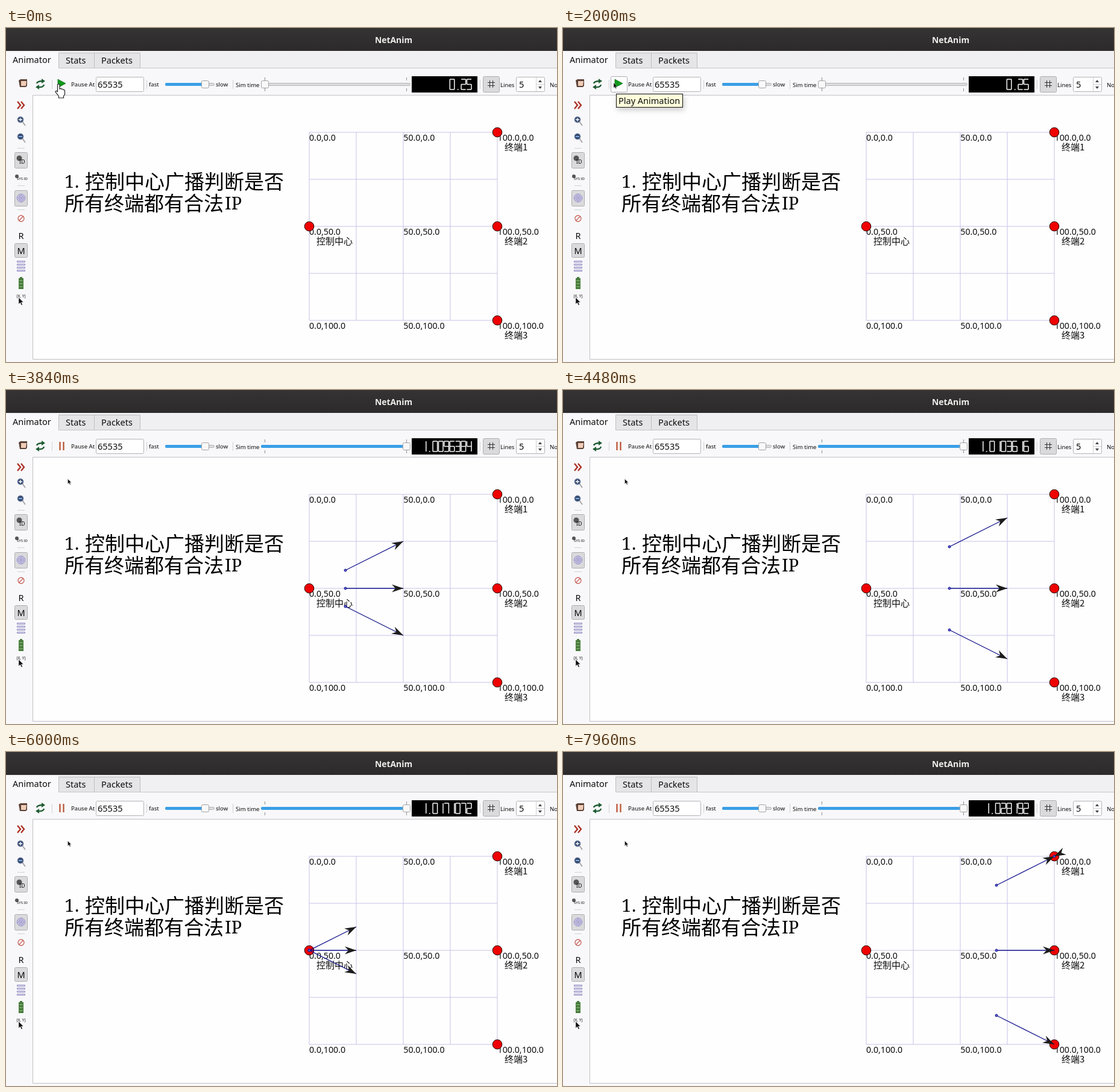
An HTML page that plays this animation: 914 px wide and 554 px high, repeating every 8 s.

```html
<!DOCTYPE html>
<html lang="zh-CN">
<head>
<meta charset="utf-8">
<title>NetAnim</title>
<style>
html, body { margin: 0; width: 100%; height: 100%; overflow: hidden; background: #fefefe; }
svg { display: block; width: 914px; height: 554px; }
text { font: 500 14.5px "Noto Sans", "Noto Sans CJK SC", sans-serif; fill: #0c0c0c; }
.small { font-size: 9.6px; }
.coord { font-size: 14.2px; }
.label { font: 15px "Noto Sans CJK SC", sans-serif; }
.caption text { font: 500 29px "Noto Serif", serif; fill: #000; }
.caption .cjk { font: 500 33px "Noto Sans CJK SC", sans-serif; }
.button { fill: #dadadc; stroke: #aeaeb0; }
.field { fill: #fff; stroke: #b4b4b8; }
.rule { stroke: #d2d2d6; fill: none; }
.groove { fill: #dcdcde; stroke: #b6b6ba; }
.filled { fill: #3a9fe6; }
.handle { fill: #f8f8f8; stroke: #a2a2a6; }
#tooltip { filter: drop-shadow(2px 4px 5px #0003); }
</style>
</head>
<body>
<svg viewBox="0 0 914 554">
  <defs>
    <linearGradient id="bar" x2="0" y2="1"><stop stop-color="#353333"/><stop offset="1" stop-color="#2c2a2a"/></linearGradient>
    <path id="arrow" d="M0 0v11l2.6-2.4 2 4.2 1.8-.9-2-4h3.4z" fill="#111" stroke="#fff" stroke-width=".4"/>
    <g id="lens"><path d="M3 3l5 7" stroke="#a9a4a8" stroke-width="2"/><circle r="5" fill="#34486e" stroke="#8d9cb8"/></g>
  </defs>

  <rect width="914" height="554" fill="#f8f8fa"/>
  <rect width="914" height="38" fill="url(#bar)"/>
  <text x="643" y="25" text-anchor="middle" style="font-size:13.9px;font-weight:700;fill:#eeeeec">NetAnim</text>

  <!-- Tabs -->
  <rect y="38" width="914" height="28" fill="#f0f0f2"/>
  <path d="M87.500 66V41.500H222.500V66M146.500 41.500V66" fill="#e5e5e7" stroke="#bebec2"/>
  <path d="M87 66.500H914" stroke="#c6c6ca"/>
  <path d="M0 39.500H87V67H0z" fill="#f9f9fb"/>
  <text x="11" y="58">Animator</text>
  <text x="99" y="59">Stats</text>
  <text x="158" y="59">Packets</text>

  <!-- Top toolbar -->
  <path d="M21 87l3-2h11v11l-2 2H23z" fill="#5c4238"/>
  <path d="M25 88h9l-1 8h-8z" fill="#f0cdb8"/>
  <path d="M51 92q1-4 10-4M63 94q-1 5-10 4" fill="none" stroke="#1f5c33" stroke-width="2.4"/>
  <path d="M59 84l6 4-6 4zM55 94l-6 4 6 4z" fill="#1f5c33"/>
  <path d="M76.500 86v15M233.500 86v15M376.500 86v15M786.500 86v15" class="rule"/>
  <rect id="hover" x="79.500" y="80.500" width="27" height="26" rx="2" fill="#fcfcfd" stroke="#aeaeb2"/>
  <path id="play" d="M86 85l13 7-13 7z" fill="#119a1c" stroke="#0a6512" stroke-width=".7"/>
  <path id="pause" d="M89.500 86v14M95.500 86v14" stroke="#b8502f" stroke-width="2.2"/>
  <text class="small" x="108" y="97">Pause At</text>
  <rect class="field" x="149.500" y="81.500" width="79" height="24" rx="2"/>
  <text x="152" y="99">65535</text>
  <text class="small" x="237" y="97">fast</text>
  <rect class="groove" x="264.500" y="91.500" width="81" height="4" rx="2"/>
  <rect class="filled" x="264" y="91" width="62" height="5" rx="2"/>
  <rect class="handle" x="324.500" y="87.500" width="12" height="12" rx="2"/>
  <text class="small" x="348" y="97">slow</text>
  <text class="small" x="381" y="98">Sim time</text>
  <path d="M429.500 82v5M429.500 100v5M664.500 82v5M664.500 100v5" stroke="#909094"/>
  <rect class="groove" x="423.500" y="91.500" width="247" height="4" rx="2"/>
  <rect id="elapsed" class="filled" x="423" y="91" width="235" height="5" rx="2"/>
  <rect id="thumb" class="handle" x="423.500" y="87.500" width="12" height="12" rx="2"/>
  <rect x="673" y="80" width="109" height="27" fill="#000"/>
  <path id="digits" fill="none" stroke="#f6f6f6" stroke-width="1.5"/>
  <rect class="button" x="791.500" y="80.500" width="27" height="26" rx="2"/>
  <path d="M802.500 87v12M807.500 87v12M799 90.500h12M799 95.500h12" stroke="#333"/>
  <text class="small" x="820" y="98">Lines</text>
  <rect class="field" x="846.500" y="81.500" width="47" height="24" rx="2"/>
  <path d="M879.500 82v23M880 93.500h13" class="rule"/>
  <path d="M883 90l3-4 3 4zM883 97l3 4 3-4z" fill="#444"/>
  <text x="851" y="99">5</text>
  <text class="small" x="902" y="98">No</text>

  <!-- Side toolbar -->
  <path d="M19 122l5 6-5 6M25 122l5 6-5 6" fill="none" stroke="#ab2f24" stroke-width="2.3"/>
  <use href="#lens" x="24" y="152"/><path d="M21 152h6M24 149v6" stroke="#fff" stroke-width="1.3"/>
  <use href="#lens" x="24" y="180"/><path d="M21 180h6" stroke="#9cf" stroke-width="1.5"/>
  <path d="M19 199.500h12M19 261.500h12M19 301.500h12" class="rule"/>
  <rect class="button" x="14.500" y="206.500" width="21" height="26" rx="2"/>
  <circle cx="22" cy="216" r="4.500" fill="#555"/>
  <text x="22" y="225" style="font-size:9px">ID</text>
  <circle cx="18" cy="246" r="3" fill="#555"/>
  <text x="18" y="252" style="font-size:6px">SYS ID</text>
  <rect class="button" x="14.500" y="269.500" width="21" height="26" rx="2"/>
  <g fill="none" stroke="#7b70d0"><circle cx="25" cy="282" r="6.500"/><circle cx="25" cy="282" r="4"/><circle cx="25" cy="282" r="1.500"/></g>
  <path d="M21 320l8-8M30 316a5 5 0 1 1-10 0 5 5 0 1 1 10 0" fill="none" stroke="#c8605a" stroke-width="1.3"/>
  <text x="25" y="350" text-anchor="middle">R</text>
  <rect class="button" x="14.500" y="357.500" width="21" height="23" rx="2"/>
  <text x="25" y="375" text-anchor="middle">M</text>
  <path d="M18.500 386.500h13v2h-13zM18.500 391.500h13v2h-13zM18.500 396.500h13v2h-13zM18.500 401.500h13v2h-13z" fill="#f0effa" stroke="#8f88c0"/>
  <path d="M23 413h4v2h2v18h-8v-18h2z" fill="#477a3c"/>
  <path d="M22 419h6M22 424h6M22 429h6" stroke="#a2c98c"/>
  <text x="25" y="447" text-anchor="middle" style="font-size:6.500px">(X, Y)</text>
  <use href="#arrow" x="21" y="447"/>

  <!-- Scene -->
  <path d="M914 111.500H44.500V549.500H914" fill="#fefefe" stroke="#c2c2c6"/>
  <g class="caption">
    <text x="97" y="265">1</text><text x="114" y="265">.</text>
    <text class="cjk" x="131" y="267">控制中心广播判断是否</text>
    <text class="cjk" x="97" y="303">所有终端都有合法</text>
    <text x="363" y="301">IP</text>
  </g>
  <g id="grid"></g>
  <g id="packets"></g>

  <g id="tooltip">
    <rect x="88.500" y="109.500" width="110" height="22" fill="#ffffdc" stroke="#111"/>
    <text x="92" y="126">Play Animation</text>
  </g>
  <path id="hand" d="M85.500 94q2-2 3.500 0v7q2-1.500 3 .5 2-1 3 1 2-.5 2.500 1.500v6l-2 3v3h-8v-3l-5.500-7q0-3 3.500-.5z" fill="#fff" stroke="#222" stroke-width="1.200"/>
  <use id="pointer" href="#arrow"/>
</svg>
<script>
const $ = id => document.getElementById(id);
const LOOP = 8000, HOVER = 1400, TOOLTIP = 1740, CLICK = 2560;
const START = 2700, STEP = 520;        // wall time of the first packet and of each step
const TICK = 0.0007232;                // simulated seconds per step
const CENTRE = [503, 329];
const TERMINALS = [[815, 173], [815, 329], [815, 485]];

function buildGrid() {
  let lines = '', coords = '', nodes = '';
  for (let i = 0; i <= 4; i++) {
    const x = 503 + 78 * i, y = 173 + 78 * i;
    lines += `M${x} 173V485M503 ${y}H815`;
  }
  for (let row = 0; row < 3; row++)
    for (let col = 0; col < 3; col++)
      coords += `<text class="coord" x="${503 + 156.3 * col}" y="${187 + 156 * row}">${col * 50}.0,${row * 50}.0</text>`;
  [CENTRE, ...TERMINALS].forEach(([x, y], i) => {
    nodes += `<circle cx="${x}" cy="${y}" r="7.800" fill="#f00000" stroke="#200"/>
      <text class="label" x="${x + 12}" y="${y + 30}">${i ? '终端' + i : '控制中心'}</text>`;
  });
  $('grid').innerHTML = `<path d="${lines}" stroke="#c6c3e6"/>${coords}${nodes}`;
}

function packet([x0, y0], [x1, y1], part) {
  const at = p => [x0 + (x1 - x0) * p, y0 + (y1 - y0) * p];
  const tip = at(part), tail = at(Math.max(0, part - 96 / 312));
  const angle = Math.atan2(y1 - y0, x1 - x0) * 180 / Math.PI;
  return `<path d="M${tail}L${tip}" stroke="#15158c" stroke-width="1.300"/>
    <circle cx="${tail[0]}" cy="${tail[1]}" r="2" fill="#5c5cd8" stroke="#15158c"/>
    <path d="M0 0L-19-6.500L-13 0L-19 6.500z" fill="#1c1c1c" transform="translate(${tip}) rotate(${angle})"/>`;
}

const broadcast = part => TERMINALS.map(to => packet(CENTRE, to, part)).join('');

// Segments in order: top, upper right, lower right, bottom, lower left, upper left, middle.
const SEGMENTS = ['M0 0h7.500', 'M7.500 0v8.500', 'M7.500 8.500v8.500', 'M0 17h7.500', 'M0 8.500v8.500', 'M0 0v8.500', 'M0 8.500h7.500'];
const LIT = ['012345', '12', '01346', '01236', '1256', '02356', '023456', '012', '0123456', '012356'];

function readout(value) {
  const chars = [...String(+value.toFixed(7))];
  return chars.map((c, i) => {
    const x = 764.5 - 9.4 * (chars.length - 1 - i);
    const parts = c === '.' ? ['M3 17h2'] : [...LIT[c]].map(s => SEGMENTS[s]);
    return parts.map(p => p.replace(/M([\d.]+) ([\d.]+)/, (_, a, b) => `M${x + +a} ${85 + +b}`)).join('');
  }).join('');
}

function show(id, on) { $(id).style.display = on ? '' : 'none'; }

function glide(t, from, to, a, b) {
  const p = Math.min(1, Math.max(0, (t - from) / (to - from)));
  return a + (b - a) * p;
}

function draw(t) {
  const clicked = t >= CLICK, running = t >= START;
  show('hand', t < HOVER);
  show('pointer', t >= HOVER);
  show('hover', t >= HOVER && !clicked);
  show('tooltip', t >= TOOLTIP && !clicked);
  show('play', !clicked);
  show('pause', clicked);
  show('elapsed', running);
  $('thumb').setAttribute('x', running ? 658.5 : 423.5);

  const x = glide(t, CLICK, 2840, 84, 101) + glide(t, 3000, 3300, 0, 1.5);
  const y = glide(t, CLICK, 2840, 91, 143) + glide(t, 3000, 3300, 0, 4.5);
  $('pointer').setAttribute('transform', `translate(${x} ${y}) scale(.75)`);

  let time = 0.25, shapes = '';
  if (running) {
    const step = Math.floor((t - START) / STEP), round = Math.floor(step / 5), part = step % 5;
    time = [1.008192, 1.016384, 1.028192][round] + part * TICK;
    // A delivered packet stays visible while the next one sets out.
    if (round && !part) shapes += broadcast(1);
    shapes += round < 2 ? broadcast(part / 4) : packet(TERMINALS[0], CENTRE, part / 4);
  }
  $('packets').innerHTML = shapes;
  $('digits').setAttribute('d', readout(time));
}

buildGrid();
const began = performance.now();
function frame() {
  draw((performance.now() - began) % LOOP);
  requestAnimationFrame(frame);
}
frame();
</script>
</body>
</html>
```
